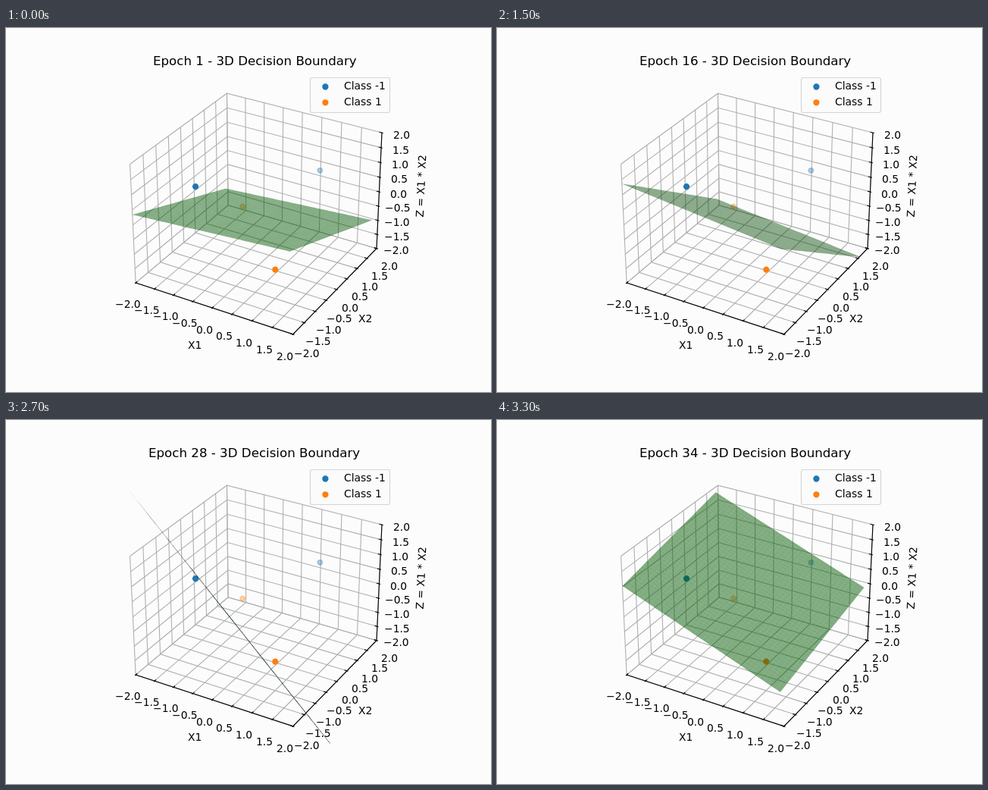
Recreate the animation shown at these times as an HTML page with a canvas. Size 640x480 px, loop 3.4 s.

```html
<!DOCTYPE html>
<html lang="en">
<head>
<meta charset="utf-8">
<title>3D Decision Boundary</title>
<style>
  html, body { margin: 0; width: 100%; height: 100%; overflow: hidden; background: #fcfcfc; }
  canvas { display: block; }
</style>
</head>
<body>
<canvas id="stage" width="640" height="480"></canvas>
<script>
const ctx = document.getElementById('stage').getContext('2d');
const BG = '#fcfcfc', BLUE = '#1f77b4', ORANGE = '#ff7f0e';
const LINE = 1.11, EPOCHS = 34, STEP = 100;
const TICKS = Array.from({ length: 9 }, (_, i) => i / 2 - 2);

// Perspective view: elevation 30, azimuth -60, distance 10.
const S = Math.sqrt(3) / 2;
function project(x, y, z) {
  x *= 0.297619; y *= 0.297619; z *= 0.223214;
  const scale = 1997.84 / (10 - (S * x / 2 - 0.75 * y + z / 2));
  return [333 + scale * (S * x + y / 2),
          237.4 - scale * (-x / 4 + S * y / 2 + S * z)];
}

function path(points) {
  ctx.beginPath();
  for (const p of points) ctx.lineTo(...project(...p));
}

function lines(color, ...points) {
  ctx.strokeStyle = color;
  ctx.lineWidth = LINE;
  path(points);
  ctx.stroke();
}

function text(str, x, baseline, size = 13.89, align = 'center') {
  ctx.font = size + 'px "DejaVu Sans", sans-serif';
  ctx.fillStyle = '#000';
  ctx.textAlign = 'left';
  if (align === 'center') x -= ctx.measureText(str).width / 2;
  ctx.fillText(str, Math.round(x), Math.round(baseline));
}

function dot(x, y, color, alpha = 1) {
  ctx.globalAlpha = alpha;
  ctx.fillStyle = ctx.strokeStyle = color;
  ctx.lineWidth = 2.08;
  ctx.beginPath();
  ctx.arc(x, y, 3.1, 0, 7);
  ctx.fill();
  ctx.stroke();
  ctx.globalAlpha = 1;
}

function drawAxes() {
  const grid = '#b0b0b0', pad = 0.332, far = 2.7216;
  for (const t of TICKS) {
    lines(grid, [t, -2, -2], [t, 2, -2], [t, 2, 2]);
    lines(grid, [2, t, -2], [-2, t, -2], [-2, t, 2]);
    lines(grid, [-2, -2, t], [-2, 2, t], [2, 2, t]);
  }
  lines('#000', [-2, -2, -2], [2, -2, -2], [2, 2, -2], [2, 2, 2]);

  const tickLabel = (t, p) => {
    const [x, y] = project(...p);
    text(t.toFixed(1).replace('-', '\u2212'), x, y + 11);
  };
  for (const t of TICKS) {
    lines('#000', [t, -2.032, -2], [t, -1.936, -2]);
    lines('#000', [2.032, t, -2], [1.936, t, -2]);
    lines('#000', [2.032, 2, t], [1.936, 2, t]);
    tickLabel(t, [t, -2 - pad, -2 - pad]);
    tickLabel(t, [2 + pad, t, -2 - pad]);
    tickLabel(t, [2 + pad, 2 + pad, t]);
  }

  const [ax, ay] = project(0, -far, -far), [bx, by] = project(far, 0, -far);
  text('X1', ax, ay + 4.5);
  text('X2', bx, by + 4.5);

  const [x0, y0] = project(2, 2, -2), [x1, y1] = project(2, 2, 2);
  ctx.save();
  ctx.translate(...project(far, far, 0));
  ctx.rotate(Math.atan2(y1 - y0, x1 - x0));
  text('Z = X1 * X2', 0, 4);
  ctx.restore();
}

// Perceptron weights [x1, x2, x1*x2, bias] in units of the learning rate.
// Each sample is corrected once per epoch until it is classified rightly.
function weights(epoch) {
  const w = [-6.91, 32.375, 76.153, 24.831];
  const fixes = [
    [19, [1, 1, -1, -1]], [32, [-1, -1, -1, -1]],
    [4, [-1, 1, -1, 1]], [23, [1, -1, -1, 1]]
  ];
  for (const [count, dir] of fixes) {
    const n = Math.min(count, epoch - 1);
    dir.forEach((d, i) => w[i] += n * d);
  }
  return w;
}

function drawSurface(epoch) {
  const [w1, w2, w3, b] = weights(epoch);
  const sx = -w1 / w3, sy = -w2 / w3, c = -b / w3;
  const light = (2 * sx + 2 * sy + 1) / 3 / Math.hypot(sx, sy, 1);
  const green = Math.round(128 * (0.3 + 0.35 * (1 + light)));
  const at = (i, j) => {
    const x = i / 10 - 2, y = j / 10 - 2;
    return [x, y, sx * x + sy * y + c];
  };
  ctx.save();
  ctx.beginPath();
  ctx.rect(143, 58, 370, 369);
  ctx.clip();
  ctx.fillStyle = `rgba(0,${green},0,0.5)`;
  for (let j = 0; j < 39; j++) {
    for (let i = 0; i < 39; i++) {
      path([at(i, j), at(i + 1, j), at(i + 1, j + 1), at(i, j + 1)]);
      ctx.fill();
    }
  }
  ctx.restore();
}

function drawLegend() {
  ctx.beginPath();
  ctx.roundRect(401.5, 65.5, 105, 46, 2.8);
  ctx.globalAlpha = 0.8;
  ctx.fillStyle = BG;
  ctx.fill();
  ctx.strokeStyle = '#ccc';
  ctx.lineWidth = 1.2;
  ctx.stroke();
  ctx.globalAlpha = 1;
  dot(421.4, 77.5, BLUE);
  dot(421.4, 98.3, ORANGE);
  text('Class -1', 446, 81, 13.89, 'left');
  text('Class 1', 446, 102, 13.89, 'left');
}

function draw(epoch) {
  ctx.fillStyle = BG;
  ctx.fillRect(0, 0, 640, 480);
  drawAxes();
  dot(...project(1, 1, 1), BLUE, 0.3);
  dot(...project(-1, -1, 1), BLUE);
  dot(...project(-1, 1, -1), ORANGE, 0.3);
  dot(...project(1, -1, -1), ORANGE);
  drawSurface(epoch);
  text(`Epoch ${epoch} - 3D Decision Boundary`, 328, 49, 16.67);
  drawLegend();
}

const start = performance.now();
let shown = 0;
function tick() {
  const epoch = Math.floor((performance.now() - start) / STEP) % EPOCHS + 1;
  if (epoch !== shown) draw(shown = epoch);
  requestAnimationFrame(tick);
}
tick();
</script>
</body>
</html>
```
